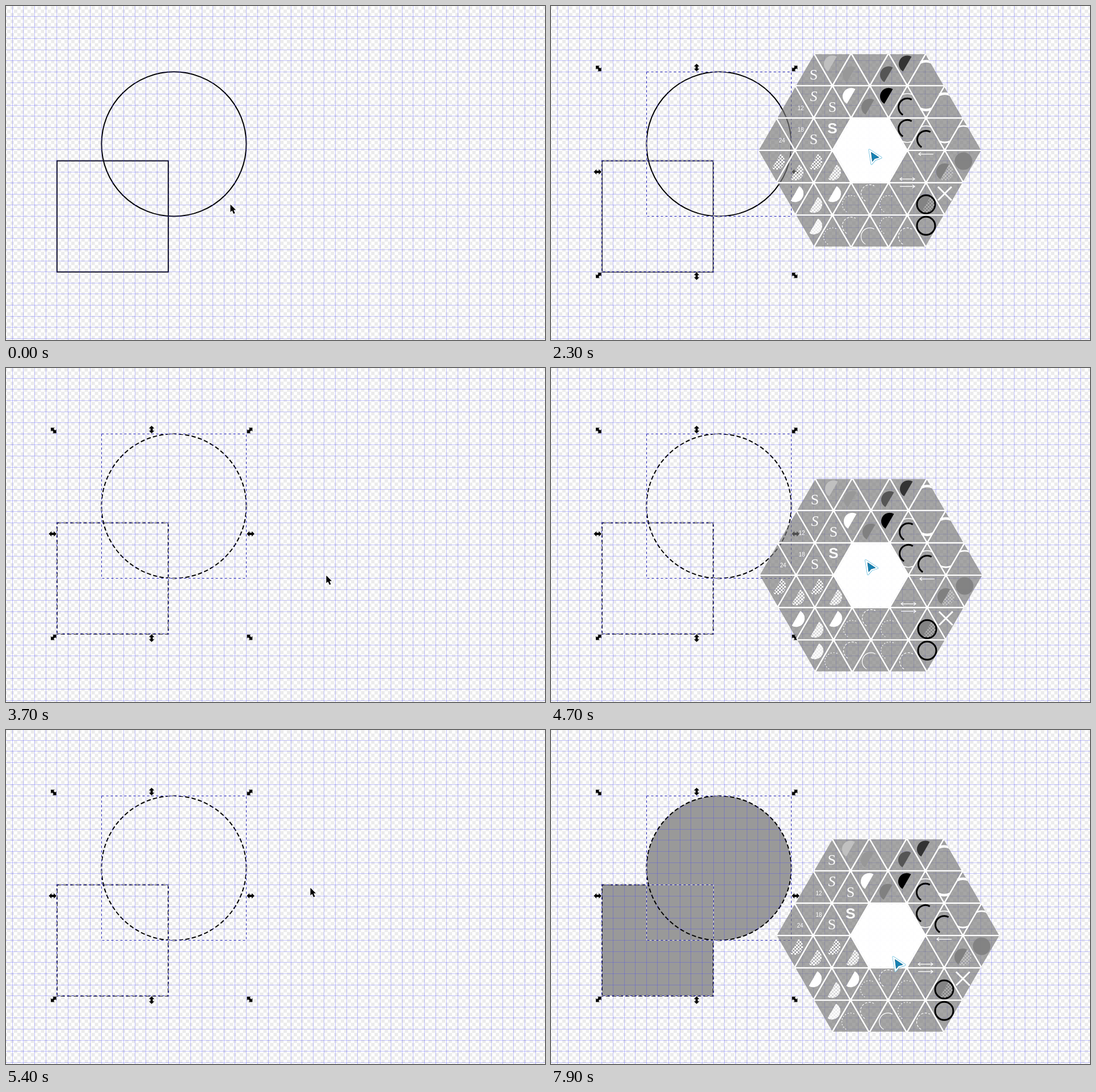
An HTML page with a canvas that plays this animation: 950 by 590 pixels, repeating every 8 s.

```html
<!DOCTYPE html>
<html lang="en">
<head>
<meta charset="utf-8">
<title>Shape style palette</title>
<style>
  html, body { margin: 0; width: 100%; height: 100%; overflow: hidden; background: #fff; }
  canvas { display: block; }
</style>
</head>
<body>
<canvas id="stage" width="950" height="590"></canvas>
<script>
const ctx = document.getElementById('stage').getContext('2d');
const LOOP = 8000, TAU = Math.PI * 2;
const STEP = 19.63, SIDE = 66, ROW = SIDE * Math.sqrt(3) / 2;
const PANEL = 'rgba(120,120,120,.66)';

const gridX = i => 11.3 + i * STEP, gridY = i => 18.2 + i * STEP;
const onGrid = (col, row, cells) => ({ x: gridX(col), y: gridY(row), size: cells * STEP });
const SQUARE = onGrid(4, 13, 10), CIRCLE = onGrid(8, 5, 13);

// Cursor moves: start time, end time, x, y
const HOME = [395, 350];
const MOVES = [
  [0, 400, 385, 345], [500, 1400, 287, 411], [1600, 1700, 421, 369], [1700, 2200, 562, 255],
  [2900, 3000, 561, 332], [3500, 3700, 564, 366], [4600, 5100, 522, 238], [5200, 6100, 585, 419],
  [6100, 6400, 587, 337], [6400, 6600, 589, 394], [6700, 6900, 594, 363], [7700, 7900, 604, 402]
];
const OPENINGS = [[2300, 3200], [4000, 5300], [7100, LOOP]];

function cursorAt(t) {
  return MOVES.reduce(([x0, y0], [from, to, x, y]) => {
    const k = Math.min(1, Math.max(0, (t - from) / (to - from)));
    return [x0 + (x - x0) * k, y0 + (y - y0) * k];
  }, HOME);
}

function checker(cell, colors) {
  const tile = document.createElement('canvas');
  tile.width = tile.height = cell * 2;
  const c = tile.getContext('2d');
  for (let i = 0; i < 4; i++) {
    const x = i % 2, y = i >> 1;
    c.fillStyle = colors[(x + y) % 2];
    c.fillRect(x * cell, y * cell, cell, cell);
  }
  return ctx.createPattern(tile, 'repeat');
}
const backdrop = checker(6, ['#ebebeb', '#fff']);
backdrop.setTransform(new DOMMatrix().translate(8, .4).scale(.99));
const speckle = checker(3, ['#fff', 'transparent']);

function at(x, y, draw, scale = 1, angle = 0) {
  ctx.save();
  ctx.translate(x, y);
  ctx.rotate(angle);
  ctx.scale(scale, scale);
  draw();
  ctx.restore();
}
function polygon(points) {
  ctx.beginPath();
  for (let i = 0; i < points.length; i += 2) ctx.lineTo(points[i], points[i + 1]);
  ctx.closePath();
}
function regular(sides, radius, start = 0) {
  ctx.beginPath();
  for (let i = 0; i < sides; i++) {
    const a = start + i * TAU / sides;
    ctx.lineTo(radius * Math.cos(a), radius * Math.sin(a));
  }
  ctx.closePath();
}
function arc(radius, from = 0, to = TAU) {
  ctx.beginPath();
  ctx.arc(0, 0, radius, from, to);
}
function fill(color) { ctx.fillStyle = color; ctx.fill(); }
function stroke(color, width, dash = []) {
  ctx.strokeStyle = color;
  ctx.lineWidth = width;
  ctx.setLineDash(dash);
  ctx.stroke();
  ctx.setLineDash([]);
}

// Icon painters receive +1 in upward triangles and -1 in downward ones
const leftArc = r => arc(r, TAU / 3, TAU * 5 / 6);
const half = color => () => { leftArc(15); fill(color); };
const mesh = alpha => () => {
  arc(15, -TAU / 6, TAU / 3);
  fill(`rgba(255,255,255,${alpha})`);
  fill(speckle);
};
const bow = (color, width, dash) => () => { leftArc(15.5); stroke(color, width, dash); };
const disc = () => { arc(15.5); fill('rgba(128,128,128,.9)'); };
const ring = () => { arc(16); stroke('#000', 3); };
const cap = width => up => { arc(24, -up * TAU / 4 - .42, -up * TAU / 4 + .42); stroke('#fff', width); };
const faintMesh = () => { ctx.globalAlpha = .35; mesh(0)(); };
const label = (text, font, dx, dy) => () => {
  ctx.font = font;
  ctx.textAlign = 'center';
  ctx.fillStyle = '#fff';
  ctx.fillText(text, dx, dy);
};
const letter = (style, family = '"Liberation Serif", serif') => label('S', `${style} 26px ${family}`, 0, 8.5);
const number = n => label(n, '10px "Liberation Sans", sans-serif', 10, 5);
const arrow = (...heads) => up => {
  const y = 12.5 * up;
  ctx.beginPath();
  ctx.moveTo(-13, y);
  ctx.lineTo(13, y);
  for (const h of heads) {
    ctx.moveTo(9 * h, y - 3);
    ctx.lineTo(13 * h, y);
    ctx.lineTo(9 * h, y + 3);
  }
  stroke('#fff', 1.2);
};
const cross = () => {
  ctx.beginPath();
  for (const s of [-1, 1]) { ctx.moveTo(-12, -12 * s); ctx.lineTo(12, 12 * s); }
  stroke('#fff', 3);
};
const both = (...parts) => up => parts.forEach(paint => paint(up));

// Each sixth of the palette holds eight icons of one kind, clockwise from the right, in reading order
const eight = rule => Array.from({ length: 8 }, (_, i) => rule(i));
const SECTORS = [
  [arrow(-1, 1), arrow(-1), both(half('#808080'), faintMesh), disc, arrow(1), both(disc, ring, faintMesh), cross, ring],
  eight(i => i === 5 ? bow('#fff', 1.2) : bow('#fff', 1.2, i % 3 === 1 ? [4, 2.5] : [2, 3])),
  eight(i => mesh(i % 2 ? (i + 1) / 10 : +(i > 3))),
  [letter(''), number(12), letter('italic'), letter(''), number(24), number(18), letter(''),
    letter('bold', '"Liberation Sans", sans-serif')],
  ['#c0c0c0', '#989898', 'transparent', '#555', '#333', '#fff', '#808080', '#000'].map(half),
  eight(i => [1, 4, 5].includes(i) ? both(bow('#000', 3), cap(1.5)) : cap(i < 4 ? 4.5 : 2.8))
];

// Six rows of triangles; the innermost six form the hole
const CELLS = [];
const used = SECTORS.map(() => 0);
for (let row = 0; row < 6; row++) {
  const count = 7 + 2 * Math.min(row, 5 - row);
  for (let i = 0; i < count; i++) {
    const up = (i % 2 === 0) === (row < 3) ? 1 : -1;
    const x = (i - (count - 1) / 2) * SIDE / 2, y = (row - 3 + (up > 0 ? 2 : 1) / 3) * ROW;
    const sector = Math.floor((Math.atan2(y, x) / TAU + 1) % 1 * 6);
    const icon = Math.hypot(x, y) < SIDE ? null : SECTORS[sector][used[sector]++];
    CELLS.push({ icon, up, x, y });
  }
}
const TILES = CELLS.filter(c => c.icon);

function drawPalette(cx, cy, mx, my) {
  const distance = c => Math.hypot(c.x + cx - mx, c.y + cy - my);
  const nearest = CELLS.reduce((a, b) => distance(b) < distance(a) ? b : a);
  const hovered = nearest.icon && nearest;
  const triangle = (up, radius) => regular(3, radius, -up * TAU / 4);
  at(cx, cy, () => {
    ctx.save();
    regular(6, 196);
    ctx.clip();
    regular(6, 64);
    fill(hovered ? PANEL : 'rgba(255,255,255,.96)');
    for (const c of TILES) at(c.x, c.y, () => { triangle(c.up, SIDE / Math.sqrt(3)); stroke('#fff', 3); });
    for (const c of TILES) at(c.x, c.y, () => {
      triangle(c.up, 35);
      fill(PANEL);
      stroke('rgba(105,105,105,.45)', .8);
      if (c !== hovered) c.icon(c.up);
    });
    ctx.restore();
    if (!hovered) return;
    at(0, 0, () => hovered.icon(hovered.up), 2.25);
    at(hovered.x, hovered.y, () => {
      triangle(hovered.up, 52.5);
      fill('rgba(92,92,92,.88)');
      stroke('#555', 1);
      triangle(hovered.up, 37);
      fill('rgba(155,155,155,.55)');
      at(0, 0, () => hovered.icon(hovered.up), 1.53);
    });
  });
}

function drawShapes(dashed, filled) {
  const paint = () => {
    if (filled) fill('#999');
    stroke('#000', 2, dashed ? [7.5, 4] : []);
  };
  const r = CIRCLE.size / 2;
  ctx.beginPath();
  ctx.rect(SQUARE.x, SQUARE.y, SQUARE.size, SQUARE.size);
  paint();
  at(CIRCLE.x + r, CIRCLE.y + r, () => { arc(r); paint(); });
}

function drawGrid() {
  ctx.fillStyle = 'rgba(65,65,255,.3)';
  for (let i = 0; i < 49; i++) {
    ctx.fillRect(Math.floor(gridX(i)), 0, 1, 590);
    ctx.fillRect(0, Math.floor(gridY(i)), 950, 1);
  }
}

function drawHandles(left, top, right, bottom) {
  for (const i of [-1, 0, 1]) for (const j of [-1, 0, 1]) {
    if (!i && !j) continue;
    const gap = i && j ? 6 : 7.6;
    const x = (left + right + i * (right - left)) / 2 + i * gap;
    const y = (top + bottom + j * (bottom - top)) / 2 + j * gap;
    at(x, y, () => {
      polygon([-6.8, 0, -2, -4.8, -2, -2, 2, -2, 2, -4.8, 6.8, 0, 2, 4.8, 2, 2, -2, 2, -2, 4.8]);
      fill('#000');
    }, 1, Math.atan2(j, i));
  }
}

function drawSelection(shapes) {
  const crisp = v => Math.floor(v) + .5;
  for (const { x, y, size } of shapes) {
    const left = crisp(x), top = crisp(y);
    ctx.beginPath();
    ctx.rect(left, top, crisp(x + size) - left, crisp(y + size) - top);
    stroke('rgba(255,255,255,.75)', 1);
    stroke('#2020b8', 1, [4, 4]);
  }
  const edge = (pick, measure) => pick(...shapes.map(measure));
  drawHandles(edge(Math.min, s => s.x), edge(Math.min, s => s.y),
    edge(Math.max, s => s.x + s.size), edge(Math.max, s => s.y + s.size));
}

function drawCursor(x, y, inPalette) {
  ctx.lineJoin = 'round';
  if (inPalette) at(x - 1, y - 1, () => {
    polygon([0, 0, 21, 14, 10.5, 17.5, 4, 25]);
    stroke('#55b4d8', 3);
    stroke('#fff', 1.6);
    fill('#fff');
    polygon([3.5, 4.5, 17, 13.5, 9.5, 15.5, 5.5, 20.5]);
    fill('#1682b4');
    stroke('#176c94', 1);
  });
  else at(x, y, () => {
    polygon([.5, .5, .5, 14, 3.6, 11.2, 6, 17, 8.6, 16, 6.2, 10.4, 10.2, 10.2]);
    stroke('#fff', 2);
    fill('#000');
  });
  ctx.lineJoin = 'miter';
}

function draw(t) {
  ctx.fillStyle = backdrop;
  ctx.fillRect(0, 0, 950, 590);
  drawShapes(t >= 3400, t >= 5500);
  drawGrid();
  if (t >= 600) drawSelection(t < 1700 ? [CIRCLE] : [SQUARE, CIRCLE]);
  const [x, y] = cursorAt(t);
  const open = OPENINGS.find(([from, to]) => t >= from && t < to);
  // The palette opens around the place where the cursor stands
  if (open) drawPalette(...cursorAt(open[0]), x, y);
  drawCursor(x, y, open);
}

const start = performance.now();
function tick() {
  const t = (performance.now() - start) % LOOP;
  draw(Math.floor(t / 100) * 100); // the picture advances ten times a second
  requestAnimationFrame(tick);
}
tick();
</script>
</body>
</html>
```
